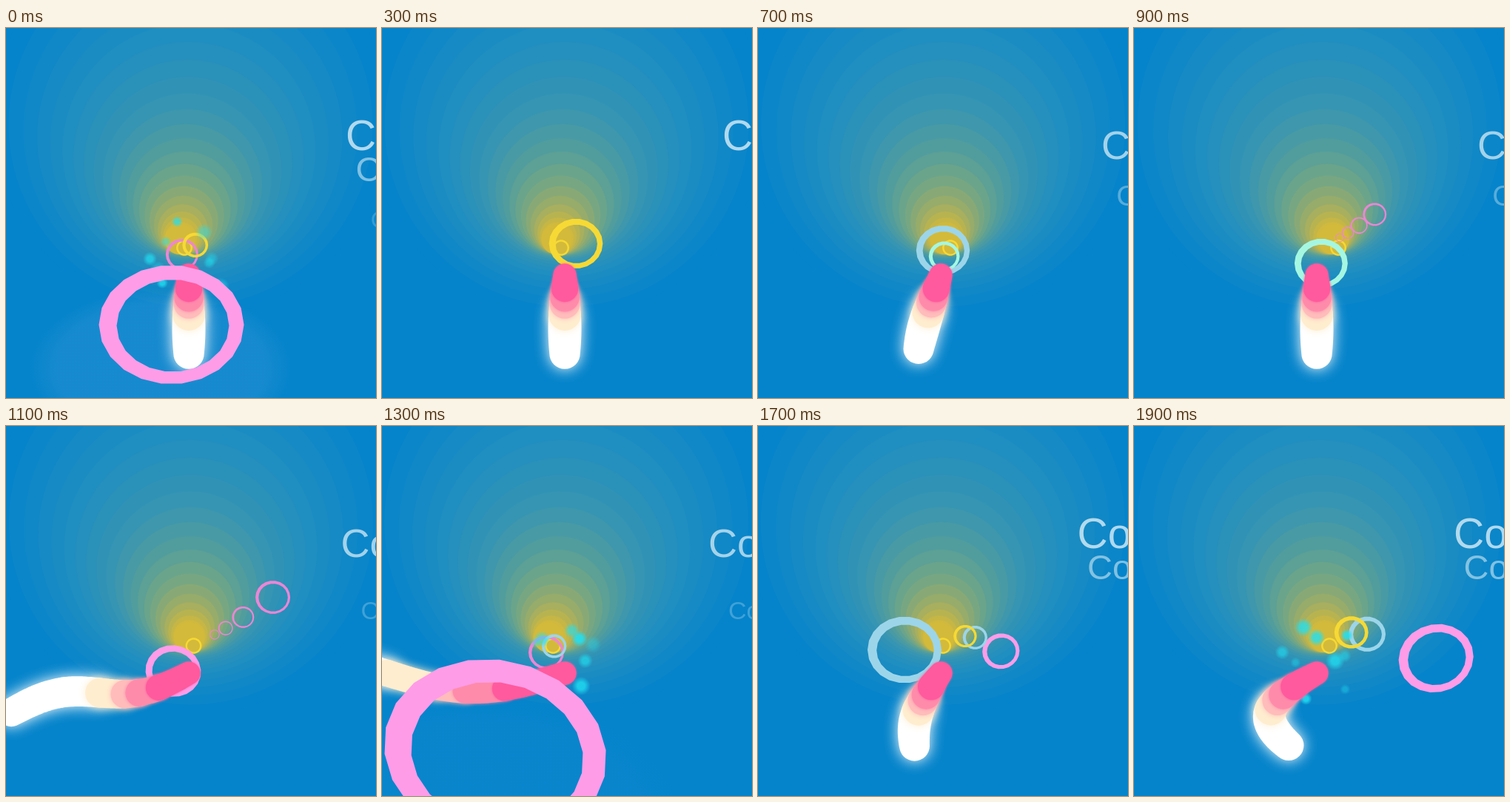
These frames come from a looping animation (500 px wide and 500 px high, 2 s). An HTML page with a canvas:

```html
<!DOCTYPE html>
<html lang="en">
<head>
<meta charset="utf-8">
<title>Ring tunnel</title>
<style>
  html, body { margin: 0; width: 100%; height: 100%; overflow: hidden; background: #0584cb; }
  canvas { display: block; width: 100vw; height: 100vh; }
</style>
</head>
<body>
<canvas id="stage" width="500" height="500"></canvas>
<script>
const ctx = document.getElementById('stage').getContext('2d');
const LOOP = 2000, STEP = 100, TAU = Math.PI * 2;
const EYE = { x: 250, y: 295 };
const PINK = '#fe9ce8', MINT = '#a5f7e2', GOLD = '#f6d935', SKY = '#9cd5ea', ORCHID = '#ee85d5';

const lerp = (a, b, u) => a + (b - a) * u;
const clamp = (v, lo, hi) => Math.max(lo, Math.min(hi, v));

function seeded(seed) {
  return () => {
    seed = (seed * 16807) % 2147483647;
    return seed / 2147483647;
  };
}

// glow: x of the tunnel's end; mid, end: sideways swing of the trail;
// textX: left edge of the nearest word; sizes: words in view
const poses = [
  { t: 0, glow: 235, mid: 0, end: 0, textX: 459, sizes: [57, 47, 32] },
  { t: 300, glow: 236, mid: 0, end: 0, textX: 460, sizes: [57] },
  { t: 500, glow: 238, mid: -34, end: -60, textX: 460, sizes: [] },
  { t: 900, glow: 270, mid: 0, end: 0, textX: 460, sizes: [54, 39] },
  { t: 1300, glow: 225, mid: -240, end: -480, textX: 437, sizes: [54, 34] },
  { t: 1500, glow: 230, mid: 2, end: -33, textX: 431, sizes: [57, 47, 32] },
  { t: 1900, glow: 258, mid: -62, end: -38, textX: 432, sizes: [57, 47] }
];

function poseAt(t) {
  const i = poses.findLastIndex(p => p.t <= t);
  const a = poses[i], b = poses[i + 1] || { ...poses[0], t: LOOP };
  const u = (t - a.t) / (b.t - a.t);
  const blend = key => lerp(a[key], b[key], u);
  return {
    glow: blend('glow'), mid: blend('mid'), end: blend('end'), textX: blend('textX'),
    sizes: (u < .5 ? a : b).sizes
  };
}

// A ring reaches the viewer at `hit`; its offset from the eye is (dx, dy) radii
const rings = [];
const ring = (color, hit, from, until, dx, dy, more) =>
  rings.push({ color, hit, from, until, dx, dy, tilt: 0, arc: [0, TAU], shift: .02, ...more });

ring(PINK, 102, 0, 0, -.27, 1.08);
ring(ORCHID, 454, 0, 100, -.55, .5);
ring(GOLD, 575, 0, 300, .33, -.1);
ring(SKY, 976, 400, 700, 0, .15);
ring(MINT, 1178, 600, 1000, .08, .64);
ring(PINK, 1366, 1000, 1300, -.64, .96, { tilt: .22 });
ring(MINT, 1614, 1400, 1500, -.64, .72, { arc: [2.05, 6.95], shift: .07 });
ring(ORCHID, 1717, 1200, 1400, -1.17, .46);
ring(SKY, 1900, 1200, 1700, -1.04, .15);
ring(PINK, 2096, 1600, 1900, 3.1, .37, { tilt: -.3 });
ring(SKY, 2300, 1700, 1900, 2.6, -.55);
ring(GOLD, 2335, 1700, 1900, 1.9, -.7);
for (let i = 0; i < 4; i++) ring(ORCHID, 900 + 625 / .72 ** i, 800, 1100, 4.7, -2.7 + i * .25);

function ringsAt(t) {
  return rings.filter(o => t >= o.from && t <= o.until).map(o => {
    const r = 10000 / (o.hit - t);
    return { ...o, r, x: EYE.x + o.dx * r, y: EYE.y + o.dy * r };
  });
}

function drawRing({ color, x, y, r, tilt, arc, shift }) {
  const sides = 22, squash = 1 - .18 * Math.min(1, r / 90);
  const hole = color === ORCHID ? .84 : .775;
  const edge = (k, dx, [a0, a1]) => {
    for (let i = 0; i <= sides; i++) {
      const a = lerp(a0, a1, i / sides);
      ctx.lineTo(Math.cos(a) * r * k + dx, Math.sin(a) * r * k * squash + dx * .7);
    }
  };
  ctx.save();
  ctx.translate(x, y);
  ctx.rotate(tilt);
  ctx.beginPath();
  edge(1, 0, arc);
  edge(hole, shift * r, [arc[1], arc[0]]);
  ctx.fillStyle = color;
  ctx.fill();
  ctx.restore();
}

function drawGlow(x) {
  ctx.fillStyle = '#0584cb';
  ctx.fillRect(0, 0, 500, 500);
  const stops = [
    [0, [212, 186, 58]], [.08, [158, 173, 102]], [.17, [114, 166, 133]], [.27, [84, 158, 156]],
    [.42, [54, 149, 178]], [.65, [32, 142, 192]], [1, [5, 132, 203]]
  ];
  const bands = 22;
  for (let i = bands; i >= 0; i--) {
    const p = (i / bands) ** 1.6;
    const n = Math.max(1, stops.findIndex(s => p <= s[0]));
    const [p0, a] = stops[n - 1], [p1, b] = stops[n];
    const rgb = a.map((v, k) => Math.round(lerp(v, b[k], (p - p0) / (p1 - p0))));
    const top = 265 - 410 * p, bottom = 306 + 85 * p ** 2.5;
    ctx.fillStyle = `rgb(${rgb})`;
    ctx.beginPath();
    ctx.arc(lerp(x, 250, p ** .5), (top + bottom) / 2, (bottom - top) / 2, 0, TAU);
    ctx.fill();
  }
}

function softSpot(x, y, rx, ry, rgb, alpha, core) {
  ctx.save();
  ctx.translate(x, y);
  ctx.scale(rx, ry);
  const g = ctx.createRadialGradient(0, 0, 0, 0, 0, 1);
  g.addColorStop(core, `rgba(${rgb},${alpha})`);
  g.addColorStop(1, `rgba(${rgb},0)`);
  ctx.fillStyle = g;
  ctx.fillRect(-1, -1, 2, 2);
  ctx.restore();
}

// Soft light that a close ring casts below itself
const drawHaze = ({ x, y, r }) =>
  softSpot(x - .15 * r, y + .6 * r, 1.8 * r, 1.1 * r, '85,160,220', Math.max(0, .55 - r / 300), .8);

function drawSparks(t) {
  for (const start of [0, 500, 1300, 1900]) {
    const age = t - start;
    if (Math.abs(age) > 100) continue;
    const random = seeded(start + 77);
    const fade = 1 - Math.abs(age) / 200;
    for (let i = 0; i < 10; i++) {
      const a = (i + random()) / 10 * TAU, d = lerp(22, 58, random()) * (1 + age / 500);
      const r = lerp(7, 14, random());
      softSpot(248 + Math.cos(a) * d, 317 + Math.sin(a) * d, r, r, '32,224,243', lerp(.3, .9, random()) * fade, .4);
    }
  }
}

// s runs from 0 at the head to 1 at the end; a wide swing flattens the trail
function trailPoint(mid, end, s) {
  const flat = Math.min(1, Math.abs(end) / 480);
  return {
    x: 247 + 4 * s * (1 - s) * mid + s * (2 * s - 1) * end,
    y: 334 + 106 * s * (1 - flat) + 24 * flat * Math.sin(TAU * s),
    r: 15.5 + 7 * Math.sin(s * 2.3) * (1 - .6 * flat)
  };
}

function drawTrail({ mid, end }) {
  const colors = ['#ff5a9d', '#ff8bab', '#ffbcbb', '#ffedcf', '#ffffff'];
  const cuts = [0, .17, .28, .36, .5, 1];
  for (let n = 4; n >= 0; n--) {
    ctx.save();
    ctx.fillStyle = ctx.shadowColor = colors[n];
    ctx.shadowBlur = 3 + n * n;
    ctx.beginPath();
    for (let i = 0; i <= 60; i++) {
      const { x, y, r } = trailPoint(mid, end, lerp(cuts[n], cuts[n + 1], i / 60));
      ctx.moveTo(x + r, y);
      ctx.arc(x, y, r, 0, TAU);
    }
    ctx.fill();
    ctx.restore();
  }
}

// Smaller words are farther away: lower, further right and fainter
function drawWords({ textX, sizes }) {
  for (const size of sizes) {
    const depth = 57 - size;
    ctx.font = `${size}px "Liberation Sans", Arial, sans-serif`;
    ctx.fillStyle = `rgba(206,232,244,${clamp((size - 22) / 41, 0, .85)})`;
    ctx.fillText('Co', textX + 1.35 * depth, 164.5 + 4.2 * depth);
  }
}

function draw(t) {
  const pose = poseAt(t), shown = ringsAt(t);
  const near = shown.filter(o => o.r > 80), far = shown.filter(o => o.r <= 80);

  drawGlow(pose.glow);
  near.forEach(drawHaze);
  drawWords(pose);
  drawRing({ color: GOLD, x: pose.glow + 6, y: 297, r: 11, tilt: 0, arc: [0, TAU], shift: 0 });
  far.forEach(drawRing);
  drawSparks(t);
  drawTrail(pose);
  near.forEach(drawRing);
}

function tick() {
  draw(Math.floor(performance.now() % LOOP / STEP) * STEP);
  requestAnimationFrame(tick);
}
tick();
</script>
</body>
</html>
```
